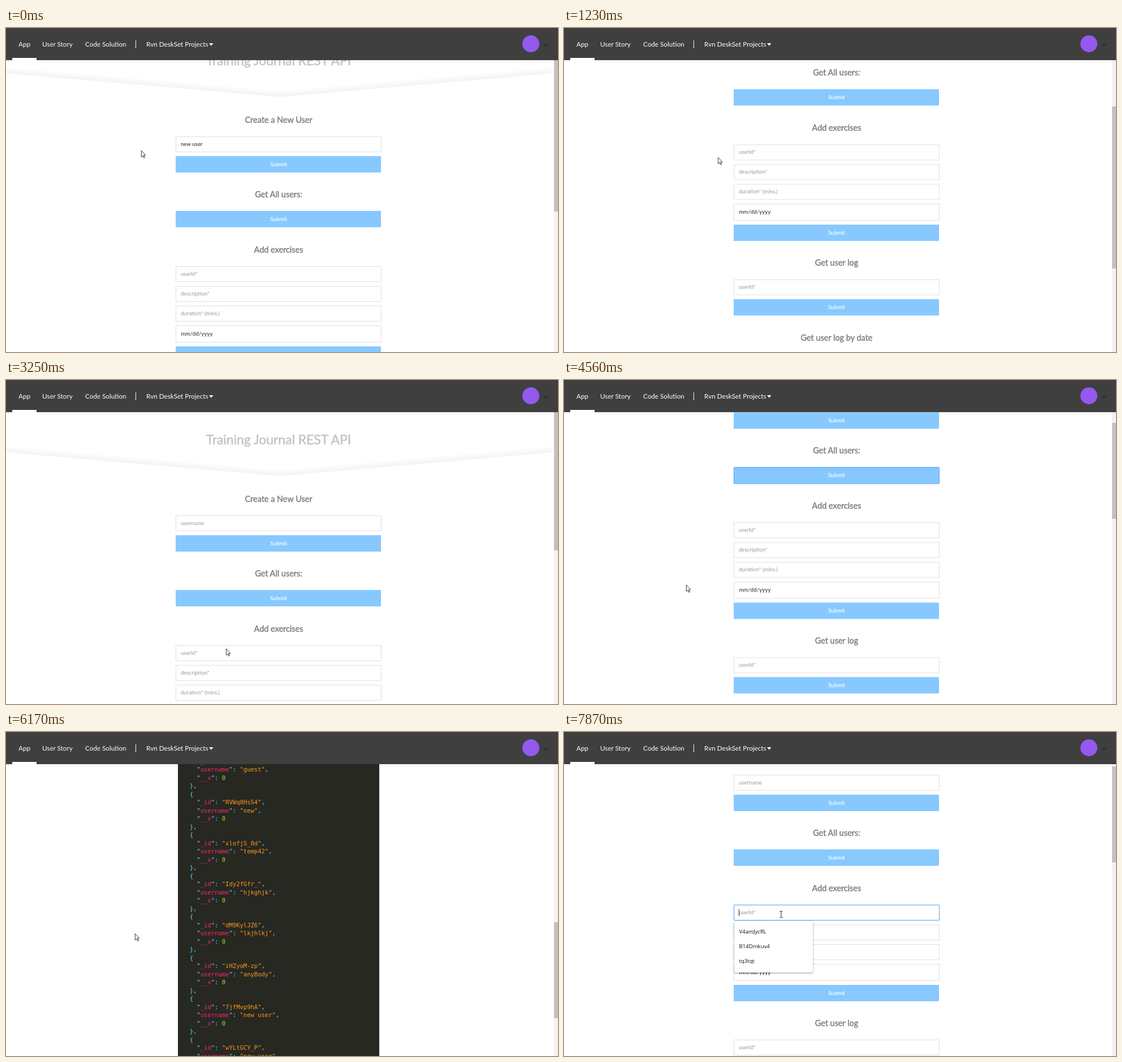
Write an HTML page that moves like this. It is 976 by 574 pixels and loops after 8000 ms.

```html
<!DOCTYPE html>
<html lang="en">
<head>
<meta charset="utf-8">
<title>REST API form</title>
<style>
@property --scroll { syntax: "<number>"; inherits: true; initial-value: 0; }

html, body { margin: 0; width: 100%; height: 100%; overflow: hidden; background: #fff; }
#stage {
  position: relative; width: 976px; height: 574px; overflow: hidden;
  background: #fff; font-family: Lato, sans-serif; font-size: 9.6px;
  animation: scroll 8s linear infinite, output 8s step-end infinite;
}
#stage div, #stage pre, #stage svg { position: absolute; box-sizing: border-box; }
#page { left: 0; top: 0; width: 968px; transform: translateY(calc(var(--scroll) * -1px)); }

.text { line-height: 20px; white-space: pre; }
.mid { left: 182px; width: 600px; text-align: center; }
.title { font-size: 22.9px; color: #c4c4c4; -webkit-text-stroke: .6px #c4c4c4; }
.head { font-size: 14.45px; color: #7b7b7b; -webkit-text-stroke: .4px #7b7b7b; }
.field { left: 300px; width: 364px; border: 1px solid #e0e0e0; background: #fff; }
.button { left: 300px; width: 363px; height: 29px; background: #87c9ff; }
.label { color: #fff; -webkit-text-stroke: .15px #fff; }
.hint { color: #999; }
.value { color: #222; }
.ring { left: 300px; width: 364px; border: 1px solid #559ff0; border-radius: 2px; }

.edge { top: 116px; width: 484px; height: 12px; background: linear-gradient(#fff, #f3f3f3); }
.edge.l { left: 0; transform-origin: 0 0; transform: skewY(4.96deg); }
.edge.r { left: 484px; transform-origin: 100% 0; transform: skewY(-4.96deg); }

pre {
  left: 304px; top: 1085px; width: 356px; margin: 0; padding: 7px 8px; border-radius: 3px;
  background: #272822; color: #66d9ef;
  font: 10.54px/14.5px "DejaVu Sans Mono", monospace;
}
pre b { color: #f92672; font-weight: 400; }
pre i { color: #fd971f; font-style: normal; }
pre u { color: #a6e22e; text-decoration: none; }
#footer { left: 0; top: calc(1194px + var(--extra)); width: 968px; height: 60px; background: #3f3f3f; }

#menu {
  left: 301px; top: 498.5px; width: 139px; height: 91px; background: #fff;
  box-shadow: 0 1px 3px rgba(0,0,0,.4); font-family: "Open Sans", sans-serif; color: #111;
}
#track { left: 969px; top: 0; width: 7px; height: 574px; background: #f1f1f1; }
#thumb {
  left: 0; top: calc(15px + var(--scroll) * var(--ratio) * 1px);
  width: 7px; height: var(--thumb); background: #c1c1c1;
}
#bar { left: 0; top: 0; width: 976px; height: 57px; background: #3f3f3f; color: #fff; font-size: 11.7px; }
#bar .tab { left: 11px; top: 53px; width: 43px; height: 4px; background: #fff; }
#bar .rule { left: 229px; top: 22px; width: 1px; height: 14px; background: #fff; }
#bar .avatar { left: 913px; top: 13px; width: 30px; height: 30px; border-radius: 50%; background: #9459ee; }
#bar svg { left: 0; top: 0; }

#pointer { left: 0; top: 0; width: 0; height: 0; animation: move 8s linear infinite; }
#pointer svg { left: 0; top: 0; overflow: visible; }

.typed { animation: typed 8s step-end infinite; }
.cleared { animation: cleared 8s step-end infinite; }
.ring1 { animation: ring1 8s step-end infinite; }
.ring2 { animation: ring2 8s step-end infinite; }
.short { animation: short 8s step-end infinite; }
.long { animation: long 8s step-end infinite; }
.picked { animation: picked 8s step-end infinite; }
.arrow { animation: arrow 8s step-end infinite; }
.beam { animation: beam 8s step-end infinite; }

@keyframes typed { 0% { visibility: visible } 6.25%, 100% { visibility: hidden } }
@keyframes cleared { 0% { visibility: hidden } 6.25%, 100% { visibility: visible } }
@keyframes ring1 { 0% { visibility: hidden } 6.25% { visibility: visible } 27.5%, 100% { visibility: hidden } }
@keyframes ring2 { 0% { visibility: hidden } 47.5% { visibility: visible } 97.5%, 100% { visibility: hidden } }
@keyframes short { 0% { visibility: visible } 48.75%, 100% { visibility: hidden } }
@keyframes long { 0% { visibility: hidden } 48.75%, 100% { visibility: visible } }
@keyframes picked { 0% { visibility: hidden } 97.5%, 100% { visibility: visible } }
@keyframes arrow { 0% { visibility: visible } 95%, 100% { visibility: hidden } }
@keyframes beam { 0% { visibility: hidden } 95%, 100% { visibility: visible } }
@keyframes output {
  0% { --ratio: .472; --thumb: 287px; --extra: 0px; }
  48.75%, 100% { --ratio: .28; --thumb: 170px; --extra: 841px; }
}
@keyframes scroll {
  0%, 12.37% { --scroll: 48; }
  20.5%, 29.5% { --scroll: 629; }
  39.5%, 51% { --scroll: 0; }
  59.95%, 60.95% { --scroll: 324; }
  70.45%, 72.3% { --scroll: 1208; }
  72.4% { --scroll: 1390; }
  73.4%, 75.1% { --scroll: 1470; }
  79.1%, 80.9% { --scroll: 840; }
  81%, 82.8% { --scroll: 620; }
  83.9%, 86.7% { --scroll: 200; }
  86.75%, 100% { --scroll: 164; }
}
@keyframes move {
  0%, .85% { transform: translate(239px, 217px); }
  5%, 7% { transform: translate(335px, 240px); }
  11.4%, 12.4% { transform: translate(270px, 224px); }
  19% { transform: translate(275px, 235px); }
  21.2% { transform: translate(408px, 420px); }
  26%, 27.1% { transform: translate(399px, 510px); }
  28.1%, 40% { transform: translate(390px, 490px); }
  46%, 47.3% { transform: translate(381px, 356px); }
  48% { transform: translate(375px, 380px); }
  50.3% { transform: translate(262px, 374px); }
  55%, 61% { transform: translate(216px, 363px); }
  70.4%, 91.4% { transform: translate(228px, 357px); }
  95% { transform: translate(315px, 328px); }
  97%, 100% { transform: translate(384px, 323px); }
}
</style>
</head>
<body>
<div id="stage">
  <div id="page">
    <div class="edge l"></div><div class="edge r"></div>
  </div>
  <div id="track"><div id="thumb"></div></div>
  <div id="bar">
    <div class="tab"></div><div class="rule"></div><div class="avatar"></div>
    <svg width="976" height="56">
      <path d="M359 27h7.5l-3.75 4.5z" fill="#fff"/>
      <path d="M951.5 28l3.3 3.3 3.3-3.3" fill="none" stroke="#222" stroke-width="1.3"/>
    </svg>
  </div>
  <div id="pointer">
    <svg class="arrow" width="10" height="15">
      <path d="M.3 .3v11.3l2.6-2.4 1.7 4 1.7-.7-1.7-3.9h3.3z" fill="#fff" stroke="#222" stroke-width=".9"/>
    </svg>
    <svg class="beam" width="10" height="15">
      <path d="M-2.5-5.5h2l.5.5.5-.5h2M0-5v10M-2.5 5.5h2l.5-.5.5.5h2" fill="none" stroke="#222"/>
    </svg>
  </div>
</div>
<script>
const page = document.getElementById('page');
const bar = document.getElementById('bar');

function add(parent, cls, style, text = '', tag = 'div') {
  const el = document.createElement(tag);
  el.className = cls;
  Object.assign(el.style, style);
  el.textContent = text;
  parent.append(el);
  return el;
}

const px = n => n + 'px';
const text = (parent, cls, x, y, str) =>
  add(parent, 'text ' + cls, { left: px(x), top: px(y - 10) }, str);
const centered = (cls, y, str) => add(page, 'text mid ' + cls, { top: px(y - 10) }, str);
const heading = (y, str) => centered('head', y, str);
const ring = (cls, top, height) => add(page, 'ring ' + cls, { top: px(top), height: px(height) });

function field(top, str, cls = 'hint', height = 28) {
  add(page, 'field', { top: px(top), height: px(height) });
  text(page, cls, 309, top + height / 2, str);
}
function dateField(top) {
  field(top, '', '', 30);
  text(page, 'value', 309.5, top + 15, 'mm/dd/yyyy').style.letterSpacing = '.15px';
}
function button(top) {
  add(page, 'button', { top: px(top) });
  centered('label', top + 14.5, 'Submit');
}

centered('title', 104.5, 'Training Journal REST API');

heading(211, 'Create a New User');
field(240, 'username', 'hint cleared');
text(page, 'value typed', 309, 254, 'new user');
button(275);
ring('ring1', 275, 30);

heading(343, 'Get All users:');
button(372);
ring('ring2', 372, 30);

heading(441, 'Add exercises');
field(470, 'userId*');
field(505, 'description*');
field(540, 'duration* (mins.)');
dateField(575);
button(612);

heading(680, 'Get user log');
field(709, 'userId*');
button(744);

heading(813, 'Get user log by date');
field(842, 'wYLtGCY_P', 'value');
dateField(878);
dateField(915);
field(952, 'limit');
button(987);

heading(1055, 'The output (json response):');

function output(cls, data) {
  const html = JSON.stringify(data, null, 2).replace(
    /"(\w+)":|("[^"]*")|\b(\d+)\b/g,
    (_, key, str, num) => key ? `"<b>${key}</b>":` : str ? `<i>${str}</i>` : `<u>${num}</u>`);
  add(page, cls, {}, '', 'pre').innerHTML = html;
}

const users = [
  ['H1kPq7RsX', 'tester'], ['bJ4mTz0Ue', 'guest'], ['RVWq0HsS4', 'new'],
  ['xlofjS_0d', 'temp42'], ['Idy2fGfr_', 'hjkghjk'], ['dM9KylJZ6', 'lkjhlkj'],
  ['iHZyoM-zp', 'anyBody'], ['7jfMvp9hA', 'new user'], ['wYLtGCY_P', 'new user'],
  ['SB0UiPeFi', 'new user'], ['V4amJycRL', 'new user'], ['tFFRlrKkx', 'new user']
];
output('short', { username: 'new user', _id: 'tFFRlrKkx' });
output('long', users.map(([_id, username]) => ({ _id, username, __v: 0 })));
add(page, '', {}).id = 'footer';

// Focused field with its suggestion list
ring('picked', 469.5, 28.5);
add(page, 'picked', { left: '309px', top: '478px', width: '1px', height: '12px', background: '#222' });
const menu = add(page, 'picked', {});
menu.id = 'menu';
['V4amJycRL', 'B14Dmkuv4', 'tq3tqt'].forEach((id, i) => text(menu, '', 8.5, 19.5 + i * 26, id));

[[22, 'App'], [64, 'User Story'], [140, 'Code Solution'], [248, 'Rvn DeskSet Projects']]
  .forEach(([x, str]) => text(bar, '', x, 28, str));
</script>
</body>
</html>
```
